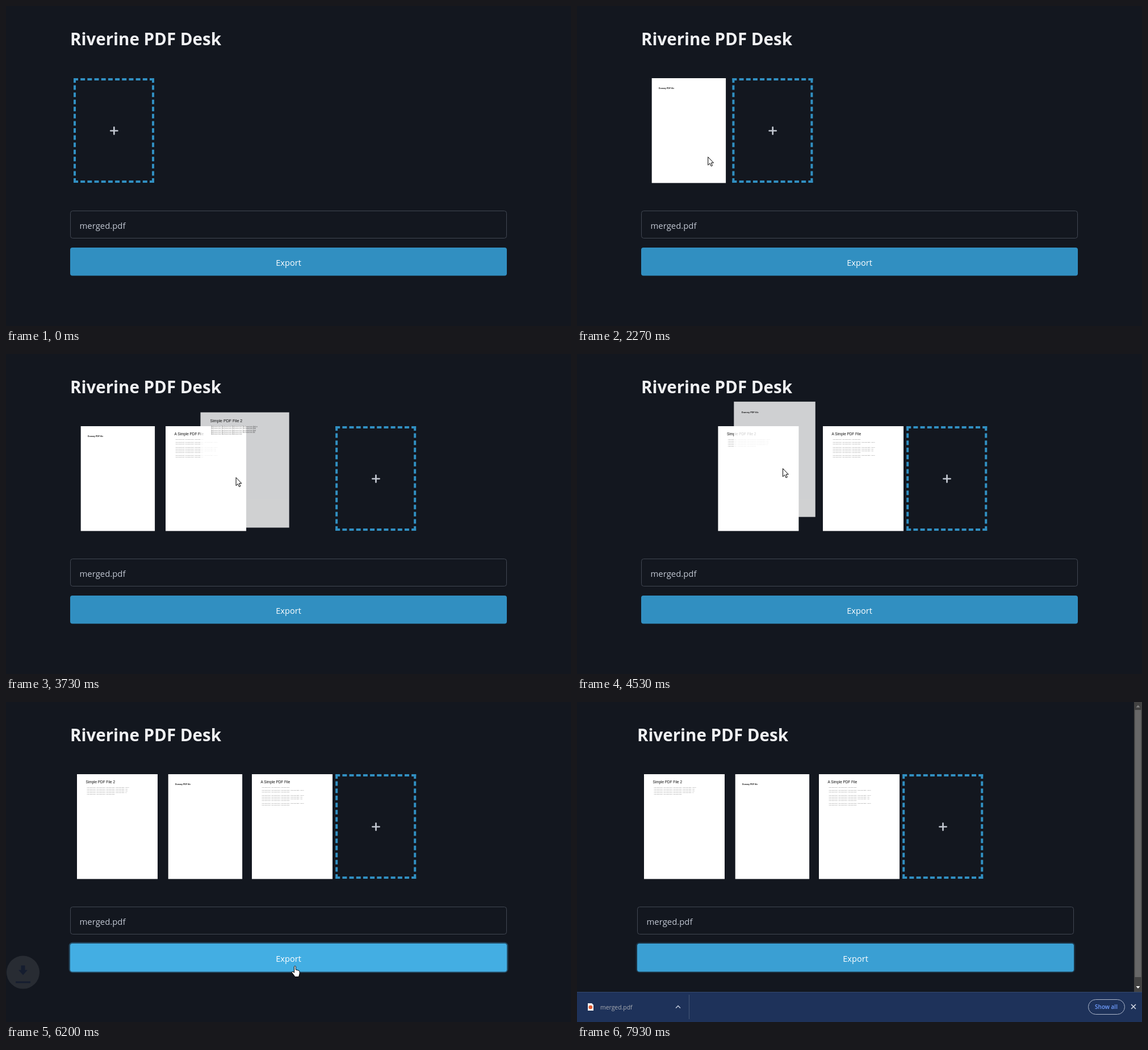
Animation of 995 by 563 pixels, one loop 7.99 s. Source, as an HTML page:

```html
<!DOCTYPE html>
<html lang="en">
<head>
<meta charset="utf-8">
<title>Riverine PDF Desk</title>
<style>
  html, body { margin: 0; width: 100%; height: 100%; overflow: hidden; background: #13171f; }
  svg { display: block; width: 995px; height: 563px; font: 14.9px "Open Sans", sans-serif; }
  .page { font: 6.4px "Liberation Sans", Arial, sans-serif; fill: #111; }
  .page rect { fill: #fff; }
  .tiny { font-size: 2.5px; fill: #666; }
  .cursor { fill: #fff; stroke: #000; stroke-linejoin: round; }
</style>
</head>
<body>
<svg viewBox="0 0 995 563">
  <g id="app">
    <text x="113" y="69" font-size="29.5" font-weight="700" fill="#f0f1f3">Riverine PDF Desk</text>
    <rect x="113.5" y="360.5" width="768" height="48" rx="4" fill="none" stroke="#414752"/>
    <text x="129.5" y="391.5" fill="#c2c8d3">merged.pdf</text>
    <rect x="113" y="425" width="769" height="49.5" rx="4" fill="#318fc1"/>
    <g id="hover">
      <rect x="112" y="424" width="771" height="51" rx="5" fill="none" stroke="#254d66" stroke-width="2.5"/>
      <rect x="113" y="425" width="769" height="49.5" rx="4" fill="#43aee3"/>
    </g>
    <text x="497.5" y="456.5" font-size="14.6" fill="#fff" text-anchor="middle">Export</text>

    <g id="simple" class="page">
      <rect width="142" height="184.4"/>
      <text x="15.5" y="16.2">A Simple PDF File</text>
    </g>
    <g id="second" class="page">
      <rect width="142" height="184.4"/>
      <text x="15.5" y="16.2">Simple PDF File 2</text>
    </g>
    <g id="dummy" class="page">
      <rect x="6.7" width="130.4" height="184.4"/>
      <text x="19" y="18.6" font-size="3.55" font-weight="700">Dummy PDF file</text>
    </g>

    <g id="zone" fill="none" stroke="#318fc1" stroke-width="4">
      <path d="M0 2H142M0 182H142" stroke-dasharray="8 4.18"/>
      <path d="M2 0V184M140 0V184" stroke-dasharray="8 4.57"/>
      <path d="M65.2 92.5H77.4M71.3 86.4V98.6" stroke="#c2c7d0" stroke-width="2.7" stroke-linecap="round"/>
    </g>
  </g>

  <g id="scrollbar">
    <rect x="981" width="14" height="511" fill="#424242"/>
    <rect x="982.5" y="14" width="11" height="470" fill="#686868"/>
    <path d="M984.5 9.5l3.5-4 3.5 4Z" fill="#868686"/>
    <path d="M984.5 500l3.5 4 3.5-4Z" fill="#fff"/>
  </g>

  <g id="shelf">
    <rect y="510" width="995" height="53" fill="#1e325a"/>
    <rect y="510" width="995" height="1" fill="#344a70"/>
    <g id="item">
      <path d="M19 530h7l3 3v10H19Z" fill="#f1f1f1"/>
      <circle cx="23.8" cy="537" r="3.3" fill="#e2592f"/>
      <text x="41" y="540.5" font-size="10.4" fill="#a8acb3">merged.pdf</text>
      <path d="M174 538.5l4-4 4 4" fill="none" stroke="#c3cbdc" stroke-width="1.5"/>
      <path d="M197.5 515V558" stroke="#465878"/>
    </g>
    <rect x="900.5" y="523.5" width="64" height="26" rx="13" fill="none" stroke="#aeb8cb"/>
    <text x="932" y="540" font-size="10" font-weight="600" fill="#6f9dff" text-anchor="middle">Show all</text>
    <path d="M976 532l8 8M984 532l-8 8" stroke="#d5dae5" stroke-width="1.6"/>
  </g>

  <g id="download">
    <circle r="29" fill="#dfe1e5"/>
    <path d="M-3.5-12h7v8H8L0 5-8-4h4.5ZM-13 16h26v3h-26Z" fill="#2a55b8"/>
  </g>

  <g id="tooltip">
    <rect x="385.5" y="247.5" width="116" height="19" fill="#2b2b2b" stroke="#707070"/>
    <text x="391" y="261" font-size="9.7" fill="#f0f0f0">Click or drop to add file</text>
  </g>
  <path id="arrow" class="cursor" d="M.5.5V14.8L3.8 11.7 6 16.7 8.3 15.7 6.1 10.8H10.3Z"/>
  <path id="hand" class="cursor" d="M-1.5 1.7C-1.5.2 1.2.2 1.2 1.7V7L6 8.2Q8.3 8.8 8.1 11V14L6.5 19.5H0Q-2.3 16-5.3 12.2C-6.2 10.7-4.2 9.5-3 10.7L-1.5 12.3Z"/>
</svg>

<script>
const LOOP = 7990, STEP = 1000 / 15;
const TOP = 127, PITCH = 154;
const slot = i => 125 + i * PITCH;
const $ = id => document.getElementById(id);

const ramp = (t, from, to) => Math.min(1, Math.max(0, (t - from) / (to - from)));
const cubicOut = p => 1 - (1 - p) ** 3;
const mix = (a, b, p) => a + (b - a) * p;
const slide = (t, start, length, a, b) => mix(a, b, cubicOut(ramp(t, start, start + length)));
const within = (t, from, to) => t >= from && t < to;
const move = (id, x, y) => $(id).setAttribute('transform', `translate(${x} ${y})`);
const fade = (id, value) => { $(id).style.opacity = value; };
const show = (id, on) => { $(id).style.display = on ? '' : 'none'; };

const secondDrag = { start: 3535, drop: 3875, end: 4070, from: 2, to: 1 };
const dummyDrag = { start: 4335, drop: 4730, end: 4930, from: 0, to: 1 };

// Each glide goes from wherever the cursor is to x, y
const glides = [
  { from: 800, to: 933, x: 205, y: 150 },
  { from: 1000, to: 1990, x: 112, y: 290 },
  { from: 2000, to: 2600, x: 378, y: 234 },
  { from: 3000, to: 3400, x: 488, y: 232 },
  { from: secondDrag.start, to: secondDrag.drop, x: 345, y: 206 },
  { from: 4000, to: 4230, x: 211, y: 235 },
  { from: dummyDrag.start, to: 4533, x: 362, y: 201 },
  { from: 4533, to: dummyDrag.drop, x: 385, y: 217 },
  { from: 5070, to: 5700, x: 520, y: 491 },
  { from: 5800, to: 5866, x: 509, y: 464 },
  { from: 6667, to: 7333, x: 110, y: 535 }
];

const cursorAt = t => glides.reduce(([x, y], glide) => {
  const p = ramp(t, glide.from, glide.to);
  return [mix(x, glide.x, p), mix(y, glide.y, p)];
}, [62, 260]);

function placePage(id, x, t, drag) {
  const lifted = drag && within(t, drag.start, drag.end);
  fade(id, lifted ? 0.8 : 1);
  if (!lifted) return move(id, x, TOP);
  const [startX, startY] = cursorAt(drag.start);
  const [cx, cy] = cursorAt(Math.min(t, drag.drop));
  const p = cubicOut(ramp(t, drag.drop, drag.end));
  const left = mix(slot(drag.from) + cx - startX, slot(drag.to), p);
  const top = TOP + (cy - startY) * (1 - p);
  $(id).setAttribute('transform',
    `translate(${left + 71} ${top + 92}) scale(1.1) translate(-71 -92)`);
}

// Small print: paragraphs of the given line counts, the last line of each cut short
function addParagraphs(id, counts) {
  let y = 24;
  for (const count of counts) {
    for (let i = 1; i <= count; i++, y += 3.05) {
      const line = document.createElementNS('http://www.w3.org/2000/svg', 'text');
      line.setAttribute('class', 'tiny');
      line.setAttribute('x', 17);
      line.setAttribute('y', y);
      line.textContent = 'And more text. '.repeat(5).slice(0, i < count ? 66 - i : 45);
      $(id).append(line);
    }
    y += 2.2;
  }
}
addParagraphs('simple', [1, 2, 4, 2]);
addParagraphs('second', [5]);

function draw(t) {
  const [x, y] = cursorAt(t);

  show('dummy', t >= 1195);
  show('simple', t >= 2900);
  show('second', t >= 2900);
  placePage('dummy', slot(t < dummyDrag.end ? 0 : 1), t, dummyDrag);
  placePage('simple', slide(t, 3732, 300, slot(1), slot(2)), t);
  placePage('second', t < secondDrag.end ? slot(2) : slide(t, 4512, 300, slot(1), slot(0)), t, secondDrag);
  move('zone', slide(t, 1200, 844, 119, 273.4) + slide(t, 2933, 844, 0, 2 * PITCH - 1.2), TOP);

  fade('hover', ramp(t, 5850, 6050) * (1 - ramp(t, 7840, 8040)));
  show('tooltip', within(t, 2860, 3050));

  const visible = within(t, 795, 995) || within(t, 1995, 7460);
  const pointing = (t < 3050 && within(x, 273, 415)) || within(t, 5860, 6700);
  show('arrow', visible && !pointing);
  show('hand', visible && pointing);
  move('arrow', x, y);
  move('hand', x, y);

  const flight = ramp(t, 6184, 6784);
  fade('download', 1 - 4 * (flight - 0.5) ** 2);
  move('download', 30, 474 + 60 * flight);

  const narrow = t >= 6530;
  move('app', narrow ? -7 : 0, 0);
  show('scrollbar', narrow);
  move('shelf', 0, 53 * (1 - ramp(t, 6400, 6600)));
  fade('item', ramp(t, 6600, 6870));
}

function tick() {
  const t = performance.now() % LOOP;
  draw(Math.floor((t + 4) / STEP) * STEP);
  requestAnimationFrame(tick);
}
tick();
</script>
</body>
</html>
```
